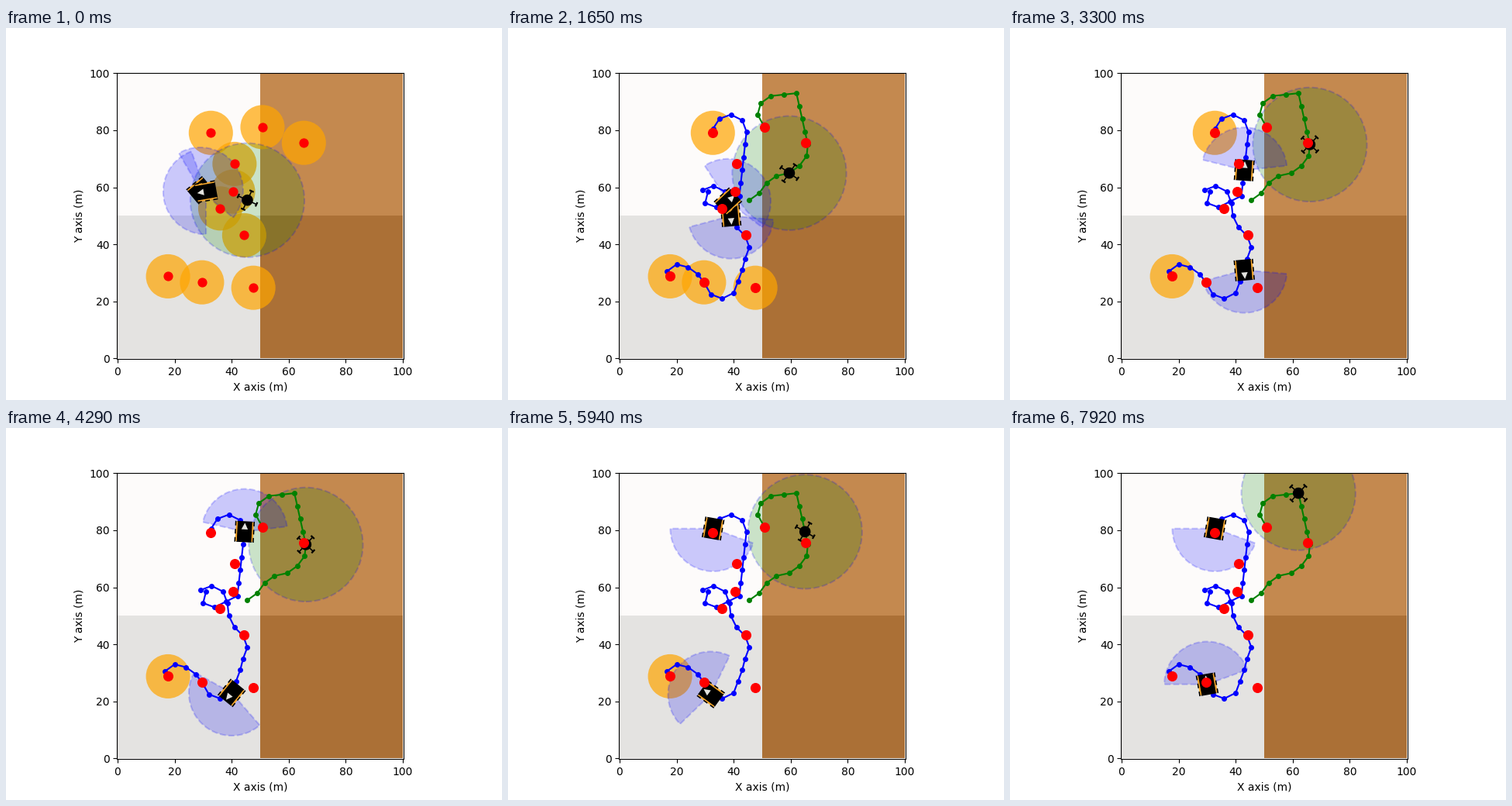
Write a matplotlib script that moves like this. It is 640 by 480 pixels and loops after 8000 ms.

```python
import numpy as np
import matplotlib.pyplot as plt
from matplotlib.animation import FuncAnimation
from matplotlib.patches import Circle, Polygon, Rectangle, Wedge

LOOP, TICK, STEP = 8000, 40, 330
PX = 100.4 / 369.6  # metres per pixel

# x, y, step at which the beacon has been seen
BEACONS = [(32.7, 79.1, 11), (50.8, 81.1, 3), (65.3, 75.6, 3), (41, 68.2, 1),
           (40.5, 58.5, 1), (36, 52.6, 1), (44.4, 43.2, 1), (17.7, 28.8, 19),
           (29.6, 26.7, 10), (47.6, 24.8, 8)]

ROVER_A = dict(
    path=[(29, 59), (33, 60.5), (37, 58.5), (38.5, 54.5), (39, 50), (41, 46),
          (44, 43), (45.5, 39), (44, 35), (43, 31), (41.5, 27), (40, 23),
          (36, 21), (32, 22.5), (30, 26), (27.5, 29.5), (24, 32), (20, 33),
          (16.5, 30.5)],
    heading=[40, 0, 315, 283, 275, 305, 300, 272, 260, 275, 255, 231, 183,
             144, 100],
    arrive=[0, 1, 2, 3, 5, 6, 7, 8, 9, 10, 11, 12, 14, 15, 19])
ROVER_B = dict(
    path=[(31, 58.5), (30, 54.5), (34, 53), (38, 55), (42, 57), (42.5, 61.5),
          (43, 66), (43.5, 70.5), (44, 75), (44.5, 79.5), (43, 83.5),
          (39, 85.5), (35, 84), (32.8, 80.6)],
    heading=[190, 275, 2, 43, 60, 85, 86, 86, 86, 87, 130, 177, 215, 260],
    arrive=[0, 2, 3, 5, 6, 8, 10, 11, 12, 13, 14, 15, 16, 17])
DRONE = dict(
    path=[(45.5, 55.5), (49, 58), (51.5, 61.5), (55, 64), (59.5, 65),
          (63, 67.5), (65.6, 71), (66, 75), (65, 79.5), (64, 84), (63, 88.5),
          (62, 93), (57.5, 92.5), (53, 92), (49.5, 89.5), (48.4, 85.5),
          (50.8, 81.1)],
    heading=[65, 10, 0, 69, 55, 0, 24, 47, 60, 57, 57, 47],
    arrive=[0, 2, 3, 4, 5, 6, 7, 8, 18, 19, 20, 21])


def pose(robot, step):
    i = np.searchsorted(robot["arrive"], step, "right") - 1
    return np.array(robot["path"][i], float), robot["heading"][i]


def box(x0, x1, y0, y1):
    return [(x0, y0), (x1, y0), (x1, y1), (x0, y1)]


class Icon:
    """Polygons in pixels around the centre, facing along +x."""

    def __init__(self, parts, zorder):
        self.parts = []
        for points, color in parts:
            patch = Polygon(points, fc=color, lw=0, zorder=zorder)
            self.parts.append((np.array(points, float) * PX, ax.add_patch(patch)))

    def place(self, pos, angle):
        c, s = np.cos(np.radians(angle)), np.sin(np.radians(angle))
        for points, patch in self.parts:
            patch.set_xy(points @ np.array([[c, s], [-s, c]]) + pos)


def rover_parts():
    parts = [(box(-13.5, 13.5, -10, 10), "black")]
    for side in (-1, 1):
        parts.append((box(-12.5, 12.5, side * 9.4, side * 11.6), "#f3a52a"))
        for x in (-10.5, 0, 10.5):
            parts.append((box(x - 3, x + 3, side * 11, side * 12.6), "black"))
    parts.append(([(11.5, 0), (3, 4.2), (3, -4.2)], "#e2e2de"))
    return parts


def drone_parts():
    turn = np.linspace(0, 2 * np.pi, 33)
    parts = [(np.c_[np.cos(turn), np.sin(turn)] * 7.3, "black")]
    for a in np.arange(4) * np.pi / 2:
        rot = np.array([[np.cos(a), np.sin(a)], [-np.sin(a), np.cos(a)]])
        for b in (box(5, 13.5, -0.8, 0.8), box(11.8, 14, -3, 3)):
            parts.append((np.array(b) @ rot, "black"))
    return parts


fig, ax = plt.subplots(figsize=(6.4, 4.8), dpi=100)
ax.set_aspect("equal")
ax.set(xlim=(-0.2, 100.2), ylim=(-0.2, 100.2),
       xlabel="X axis (m)", ylabel="Y axis (m)")

for x, y, color in [(0, 50, "#fdfbfa"), (50, 50, "#c4894f"),
                    (0, 0, "#e4e3e1"), (50, 0, "#ab7036")]:
    ax.add_patch(Rectangle((x, y), 50, 50, fc=color, lw=0, zorder=0))

discs = [ax.add_patch(Circle((x, y), 7.75, fc="orange", alpha=0.7, lw=0, zorder=1))
         for x, y, _ in BEACONS]

view = dict(ec="blue", ls="--", lw=1.5, alpha=0.2)
drone_view = ax.add_patch(Circle((0, 0), 20, fc="green", zorder=2, **view))
rovers = [(r, ax.add_patch(Wedge((0, 0), 15, 0, 160, fc="blue", zorder=2, **view)),
           Icon(rover_parts(), 4)) for r in (ROVER_A, ROVER_B)]
drone_icon = Icon(drone_parts(), 4)

paths = [ax.plot(*zip(*r["path"]), color=c, marker="o", ms=4, zorder=3)[0]
         for r, c in ((ROVER_A, "blue"), (ROVER_B, "blue"), (DRONE, "green"))]
# the last leg of the drone's route has no marker
paths[2].set_markevery(slice(0, -1))
dots, = ax.plot([b[0] for b in BEACONS], [b[1] for b in BEACONS], "o",
                color="red", zorder=5)


def update(frame):
    step = (frame * TICK + 30) // STEP
    for disc, (_, _, seen) in zip(discs, BEACONS):
        disc.set_visible(step < seen)
    for line in paths:
        line.set_visible(step > 0)
    dots.set_markersize(8.4 if step else 7.8)

    for robot, wedge, icon in rovers:
        pos, angle = pose(robot, step)
        wedge.set_center(tuple(pos))
        wedge.set_theta1(angle - 80)
        wedge.set_theta2(angle + 80)
        icon.place(pos, angle)

    pos, angle = pose(DRONE, step)
    drone_view.set_center(tuple(pos))
    drone_icon.place(pos, angle)
    return []


anim = FuncAnimation(fig, update, frames=LOOP // TICK, interval=TICK,
                     repeat=True, repeat_delay=0)
plt.show()
```
